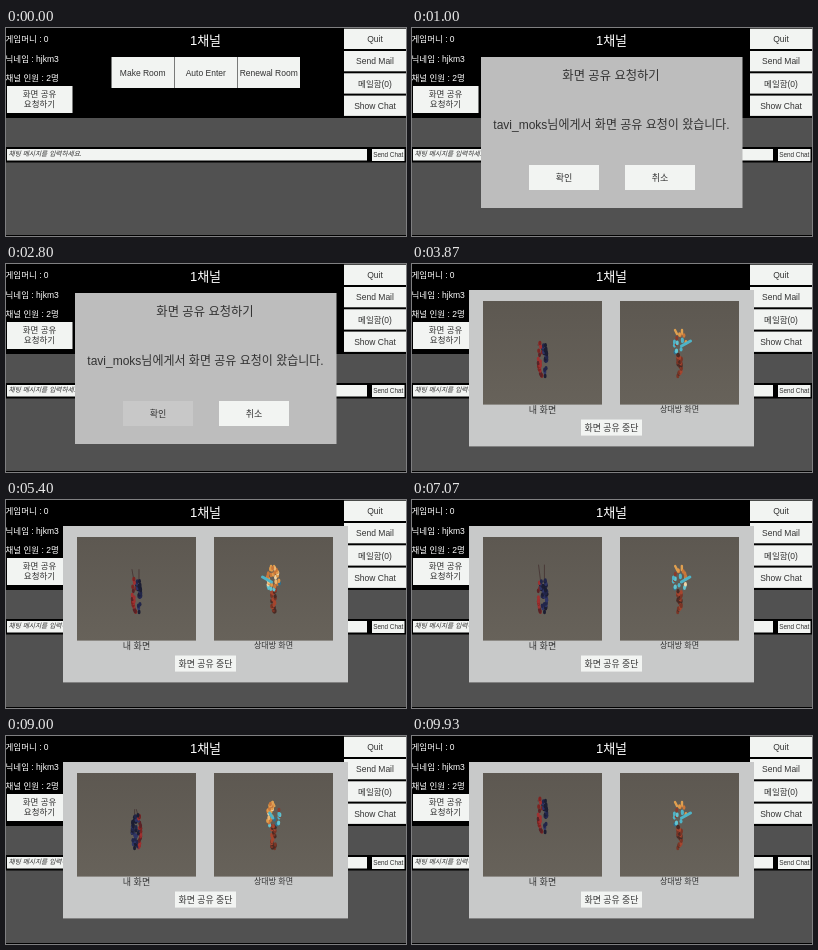
An HTML page for the animation above (10000 ms loop, 400 px wide and 208 px high).

```html
<!DOCTYPE html>
<html lang="ko">
<head>
<meta charset="utf-8">
<title>1채널</title>
<style>
html, body { margin: 0; width: 100%; height: 100%; overflow: hidden; background: #000; }
svg { display: block; width: 100vw; height: 100vh; }
text { font-family: "Liberation Sans", "Noto Sans CJK KR", "Noto Sans CJK", sans-serif; white-space: pre; }
line { stroke-linecap: round; }
</style>
</head>
<body>
<svg id="stage" viewBox="0 0 400 208">
  <defs>
    <linearGradient id="room" x1="0" y1="0" x2="0" y2="1">
      <stop offset="0" stop-color="#5d5851"/>
      <stop offset="1" stop-color="#67625a"/>
    </linearGradient>
  </defs>
</svg>
<script>
const LOOP = 10000, STEP = 1000 / 15;
const ASK = 1000, PRESS = 2600, SHARE = 2860, DANCE = 3400;
const INK = '#323232', PAPER = '#f2f4f2';
const stage = document.getElementById('stage');

function add(parent, tag, attrs, content) {
  const el = document.createElementNS('http://www.w3.org/2000/svg', tag);
  set(el, attrs);
  if (content) el.textContent = content;
  parent.append(el);
  return el;
}
function set(el, attrs) {
  for (const k in attrs) el.setAttribute(k, attrs[k]);
}
const group = () => add(stage, 'g', {});
const box = (g, x, y, r, b, fill) =>
  add(g, 'rect', { x, y, width: r - x, height: b - y, fill });
// y is the vertical middle of the line
const label = (g, str, x, y, size, fill = INK, anchor = 'middle') =>
  add(g, 'text', { x, y: y + size * 0.36, 'font-size': size, fill, 'text-anchor': anchor }, str);
function button(g, x, y, r, b, str, size = 8.5) {
  const face = box(g, x, y, r, b, PAPER);
  label(g, str, (x + r) / 2, (y + b) / 2, size);
  return face;
}

// Lobby
const lobby = group();
box(lobby, 0, 90, 400, 119, '#515151');
box(lobby, 0, 134.5, 400, 207, '#515151');
['게임머니 : 0', '닉네임 : hjkm3', '채널 인원 : 2명'].forEach((s, i) =>
  label(lobby, s, -0.5, 11 + i * 19.5, 8.5, '#fff', 'start'));
label(lobby, '1채널', 199.5, 12, 13, '#fff');
box(lobby, 1, 58, 66.5, 85, PAPER);
label(lobby, '화면 공유', 33.5, 66, 8.5);
label(lobby, '요청하기', 33.5, 76, 8.5);
['Make Room', 'Auto Enter', 'Renewal Room'].forEach((s, i) =>
  button(lobby, 105.5 + i * 63, 29, 168 + i * 63, 60, s));
['Quit', 'Send Mail', '메일함(0)', 'Show Chat'].forEach((s, i) =>
  button(lobby, 338, 0.7 + i * 22.3, 400, 21 + i * 22.3, s));
box(lobby, 1, 121, 361, 132.5, PAPER);
label(lobby, '채팅 메시지를 입력하세요.', 2.5, 126, 6.7, INK, 'start')
  .setAttribute('font-style', 'italic');
button(lobby, 366, 121, 398.5, 133, 'Send Chat', 6.4);

// Request dialog
const dialog = group();
box(dialog, 69, 29, 330.5, 180, '#bdbdbd');
label(dialog, '화면 공유 요청하기', 199, 48, 12.3);
label(dialog, 'tavi_moks님에게서 화면 공유 요청이 왔습니다.', 199.5, 97, 12);
const accept = button(dialog, 117, 137, 187, 162, '확인', 9);
button(dialog, 213, 137, 283, 162, '취소', 9);

// Sharing panel
const panel = group();
box(panel, 57, 26, 342, 182.4, '#c8c9c9');
for (const x of [71, 208]) box(panel, x, 37, x + 119, 140.6, 'url(#room)');
label(panel, '내 화면', 130.5, 145.7, 9);
label(panel, '상대방 화면', 267.5, 145, 8);
button(panel, 169, 155.5, 230, 171.6, '화면 공유 중단', 8.9);

// A dancer is a column of colour dabs wrapped around a vertical axis.
let seed = 7;
const random = () => (seed = (seed * 16807) % 2147483647) / 2147483647;
const pick = list => list[Math.floor(random() * list.length)];

const REDS = ['#7c2422', '#a03030', '#5a2226'];
const BLUES = ['#22264a', '#2f3566', '#1c1e33'];
const LEGS = ['#7a3526', '#4a2a24', '#a5452e'];
const VEST = ['#4fb3c6', '#2f6f8f', '#8a3b2c', '#62c3d0'];
const HAIR = ['#e09a4a', '#eab672', '#c9773a', '#f0d6a8'];

const warrior = {
  axis: 130.5, tall: 33, turns: 4, hop: 20, tip: 16, reach: 0, trim: '#4a3a38',
  girth: h => 2.6 + 1.8 * Math.sin(Math.PI * h),
  tint: (h, a) => pick(Math.cos(a) < 0 ? REDS : BLUES)
};
const mage = {
  axis: 267.5, tall: 44, turns: 2, hop: 0, tip: 4, reach: 11, trim: '#e0a050',
  girth: h => h < 0.5 ? 1.8 : 2 + 4.5 * Math.sin(Math.PI * (h - 0.4) / 0.65),
  tint: (h, a) => pick(h > 0.72 - 0.2 * Math.cos(a + Math.PI / 2) ? HAIR : h > 0.5 ? VEST : LEGS)
};

function build(d, count = 90) {
  d.tips = [-1, 1].map(side => ({
    side, el: add(panel, 'line', { stroke: d.trim, 'stroke-width': d.reach ? 2.4 : 1 })
  }));
  d.dabs = Array.from({ length: count }, (_, i) => {
    const h = i / (count - 1), a = random() * 2 * Math.PI;
    return { h, a, el: add(panel, 'ellipse', { rx: 1.5, ry: 2.3, fill: d.tint(h, a) }) };
  });
  if (d.reach) d.arm = add(panel, 'line', { stroke: VEST[0], 'stroke-width': 3 });
}

function pose(d, t) {
  const u = (t - 3870) / 6060;
  const turn = 2 * Math.PI * d.turns * u;
  const beat = Math.cos(2 * Math.PI * (t - 9866) / (1000 * 16 / 15));
  const foot = 112 - d.hop * Math.max(0, (beat - 0.6) / 0.4);
  const head = foot - d.tall;
  for (const { h, a, el } of d.dabs) {
    set(el, {
      cx: d.axis + d.girth(h) * Math.cos(a + turn),
      cy: foot - h * d.tall,
      visibility: Math.sin(a + turn) > -0.2 ? 'inherit' : 'hidden'
    });
  }
  const rise = d.tip * (d.reach ? 1 : Math.max(0, Math.sin(Math.PI * u)));
  for (const { side, el } of d.tips) {
    const x = d.axis + side * 2.5 * Math.cos(turn);
    set(el, { x1: x, y1: head + 2, x2: x + side - 1, y2: head - rise + 2 });
  }
  if (d.arm) set(d.arm, {
    x1: d.axis + 2 * Math.cos(turn), y1: head + 14,
    x2: d.axis + d.reach * Math.cos(turn), y2: head + 9
  });
}

const dancers = [warrior, mage];
dancers.forEach(d => build(d));

const show = (el, on) => el.setAttribute('visibility', on ? 'visible' : 'hidden');

function draw(now) {
  const t = Math.floor(((now % LOOP) + 5) / STEP) % 150 * STEP;
  show(dialog, t >= ASK && t < SHARE);
  show(panel, t >= SHARE);
  accept.setAttribute('fill', t < PRESS - 1 ? PAPER : '#c8c8c8');
  for (const d of dancers) pose(d, Math.max(t, DANCE));
}

const start = performance.now();
function tick() {
  draw(performance.now() - start);
  requestAnimationFrame(tick);
}
tick();
</script>
</body>
</html>
```
